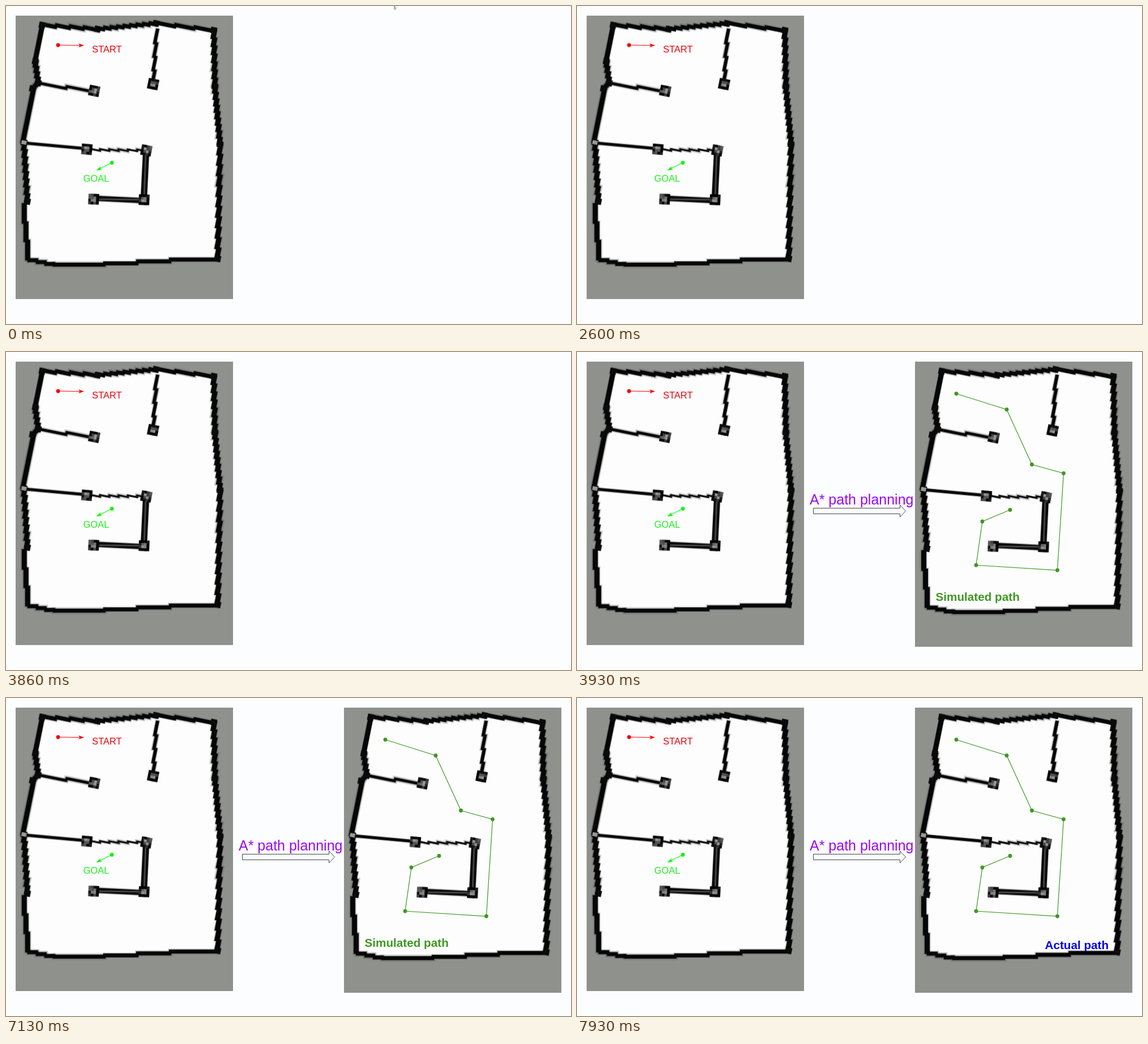
An HTML page with a canvas for the animation above (8000 ms loop, 998x561 px).

```html
<!DOCTYPE html>
<html lang="en">
<head>
<meta charset="utf-8">
<title>Path planning</title>
<style>
  html, body { margin: 0; width: 100%; height: 100%; overflow: hidden; background: #fcfdff; }
  canvas { display: block; }
</style>
</head>
<body>
<canvas id="stage" width="998" height="561"></canvas>
<script>
const LOOP = 8000, CURSOR_OUT = 2260, PLAN_IN = 3930, ACTUAL_IN = 7530;
const PAPER = '#fcfdff', GREEN = '#3f9722';
const TILT = 0.2; // rotation of the scanned cell grid
const STEP = 3.2; // sideways drift that starts a new cell row
const ctx = document.getElementById('stage').getContext('2d');

// Outer walls, clockwise from the left side, then back along the bottom
const upper = {
  tilt: TILT, thick: 7,
  points: [[38, 345], [32, 241], [47, 146], [57, 136], [52, 98], [64, 34], [162, 41],
    [265, 31], [367, 43], [369, 142], [378, 244], [374, 446]]
};
const lower = {
  tilt: 0, thick: 7,
  points: [[374, 446], [290, 449], [174, 456], [85, 457], [40, 447], [31, 350]]
};
// Inner walls carry a post at every point but the first
const inner = [
  { tilt: TILT, thick: 5, points: [[58, 138], [156, 150]] },
  { tilt: TILT, thick: 4, points: [[266, 42], [260, 138]] },
  { tilt: 0.09, thick: 5, points: [[33, 241], [143, 253]] },
  { tilt: TILT, thick: 3, points: [[150, 254], [248, 255]] },
  { tilt: 0.05, thick: 9, points: [[247, 258], [244, 342], [155, 341]] }
];
const walls = [upper, lower, ...inner];
const route = [
  [670, 73.5], [759, 101.5], [803.5, 198.5], [859.5, 214],
  [848.5, 385], [705, 376], [716, 299], [765, 278.5]
];

let seed = 7;
const random = () => (seed = seed * 16807 % 2147483647) / 2147483647;
const grey = v => `rgb(${v},${v},${v})`;

function trace(c, points, close) {
  c.beginPath();
  points.forEach(p => c.lineTo(...p));
  if (close) c.closePath();
}

function box(c, x, y, w, h, tilt, color) {
  c.save();
  c.translate(x, y);
  c.rotate(tilt);
  c.fillStyle = color;
  c.fillRect(-w / 2, -h / 2, w, h);
  c.restore();
}

// One wall as cells along the grid; the more it strays from the grid, the more teeth
function side(c, [x1, y1], [x2, y2], { tilt, thick }, halo) {
  const dx = x2 - x1, dy = y2 - y1;
  const upright = Math.abs(dy) > Math.abs(dx);
  const drift = dx * Math.sin(tilt) - dy * Math.cos(tilt);
  const lean = dx * Math.cos(tilt) + dy * Math.sin(tilt);
  const n = Math.max(1, Math.round(Math.abs(upright ? lean : drift) / STEP));
  const length = Math.hypot(dx, dy) / n + 4;
  const width = thick + (upright ? 2 : 0);
  for (let i = 0; i < n; i++) {
    const k = (i + 0.5) / n, grow = halo ? 1 + random() * 4 : 0;
    box(c, x1 + dx * k, y1 + dy * k, length + grow, width + grow,
      tilt + (upright ? Math.PI / 2 : 0), halo ? 'rgba(70,70,70,.3)' : '#060606');
  }
}

function wall(c, w, halo) {
  w.points.slice(1).forEach((p, i) => side(c, w.points[i], p, w, halo));
}

// Black frame of cells around a mottled core
function post(c, [x, y], tilt) {
  const cell = 4.6;
  c.save();
  c.translate(x, y);
  c.rotate(tilt);
  for (let i = -1.5; i < 2; i++) {
    for (let j = -1.5; j < 2; j++) {
      const core = Math.abs(i) < 1 && Math.abs(j) < 1;
      const shade = core ? 60 + random() * 100 : random() ** 4 * 90;
      box(c, i * cell, j * cell, cell + 0.4, cell + 0.4, 0, grey(shade));
    }
  }
  c.restore();
}

function buildMap() {
  const map = document.createElement('canvas');
  map.width = 384;
  map.height = 500;
  const c = map.getContext('2d');
  c.fillStyle = '#8f918d';
  c.fillRect(0, 0, 384, 500);
  c.translate(-17, -17);
  c.filter = 'blur(0.6px)';
  trace(c, [...upper.points, ...lower.points], true);
  c.fillStyle = '#fdfdfe';
  c.fill();
  walls.forEach(w => wall(c, w, true));
  walls.forEach(w => wall(c, w, false));
  upper.points.forEach(([x, y]) => box(c, x, y, 11, 11, TILT, '#0a0a0a'));
  trace(c, inner[4].points);
  c.strokeStyle = '#444';
  c.lineWidth = 3;
  c.stroke();
  inner.forEach(w => w.points.slice(1).forEach(p => post(c, p, w.tilt)));
  box(c, ...upper.points[1], 9, 7, TILT, '#999');
  return map;
}

function dot([x, y], color) {
  ctx.beginPath();
  ctx.arc(x, y, 3.4, 0, 7);
  ctx.fillStyle = color;
  ctx.fill();
}

function path(points, color) {
  trace(ctx, points);
  ctx.strokeStyle = color;
  ctx.lineWidth = 1.2;
  ctx.stroke();
}

function text(str, x, y, size, color, weight = '') {
  ctx.font = `${weight} ${size}px "Liberation Sans", Arial, sans-serif`;
  ctx.fillStyle = color;
  ctx.fillText(str, x, y);
}

function pose(from, to, color) {
  dot(from, color);
  path([from, to], color);
  ctx.save();
  ctx.translate(...to);
  ctx.rotate(Math.atan2(to[1] - from[1], to[0] - from[0]));
  trace(ctx, [[1, 0], [-9, -3.5], [-6.5, 0], [-9, 3.5]], true);
  ctx.fillStyle = color;
  ctx.fill();
  ctx.restore();
}

function outline(points, fill, stroke) {
  trace(ctx, points, true);
  ctx.fillStyle = fill;
  ctx.fill();
  ctx.strokeStyle = stroke;
  ctx.lineWidth = 1;
  ctx.stroke();
}

function drawPlan(actual) {
  ctx.drawImage(map, 597, 16.7, 384.2, 503);
  const half = [[417.5, 5], [570.5, 5], [570.5, 10.5], [580.5, 0]];
  const edge = sign => half.map(([x, y]) => [x, 280.5 + sign * y]);
  outline([...edge(-1), ...edge(1).reverse()], PAPER, '#444');
  text('A* path planning', 411, 269, 25, '#9a08f5');
  path(route, GREEN);
  route.forEach(p => dot(p, GREEN));
  if (actual) text('Actual path', 826.5, 442.5, 20.7, '#0505e6', 'bold');
  else text('Simulated path', 633.5, 439, 20.7, GREEN, 'bold');
}

const map = buildMap();

function frame(now) {
  const t = now % LOOP;
  ctx.fillStyle = PAPER;
  ctx.fillRect(0, 0, 998, 561);
  ctx.drawImage(map, 16.7, 16.7, 384.2, 500);
  pose([92, 69], [137, 69.5], '#f00508');
  text('START', 152, 81.5, 16.5, '#e6050c');
  pose([187, 276.5], [160.5, 289.5], '#12f512');
  text('GOAL', 136.5, 309.5, 16.4, '#1cf01c');
  if (t < CURSOR_OUT) outline([[686, 0], [686, 6], [689, 5]], '#fff', '#777');
  if (t >= PLAN_IN) drawPlan(t >= ACTUAL_IN);
  requestAnimationFrame(frame);
}
requestAnimationFrame(frame);
</script>
</body>
</html>
```
